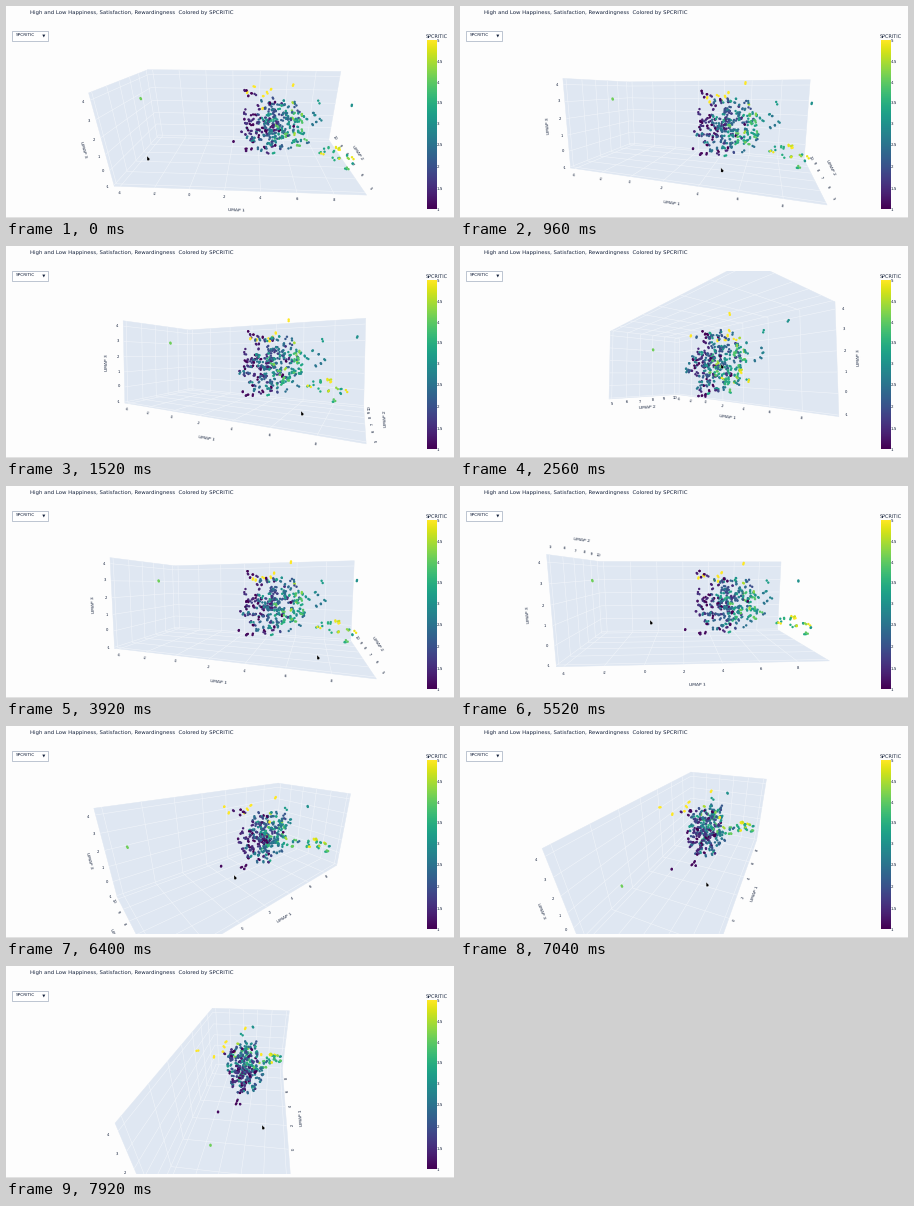
These frames come from a looping animation (448 px wide and 212 px high, 8 s). A matplotlib script:

```python
import numpy as np
import matplotlib as mpl
import matplotlib.pyplot as plt
from matplotlib.animation import FuncAnimation
from matplotlib.collections import LineCollection, PolyCollection
from matplotlib.patches import Polygon, Rectangle

mpl.rcParams["font.family"] = "DejaVu Sans"
mpl.rcParams["text.hinting"] = "none"

W, H, DPI = 448, 212, 100
FRAMES, STEP = 100, 80
PAGE, INK, WALL, GRID = "#fdfdfd", "#16233d", "#dfe7f2", "#f1f5fa"

# Scene viewport, focal length and camera distance (box half-length = 1)
VIEW = (58, 25, 352, 183)
CX, CY, FOCAL, DIST = 234, 116.5, 221, 2.02
HALF = np.array([1, 0.46, 0.39])

# Tick positions and labels along each axis
TICK_POS = [-0.95 + 0.284 * np.arange(7),
            0.42 - 0.17 * np.arange(6),
            0.34 - 0.144 * np.arange(6)]
TICK_LABELS = [range(-4, 9, 2), range(10, 4, -1), range(4, -2, -1)]

# Camera drag: time, azimuth, elevation, cursor x, cursor y
KEYS = np.array([
    (0, 3, 23, 142, 152),
    (1520, 28.5, 2.3, 296, 167),
    (2560, 53, -3, 262, 120),
    (3920, 18, 5, 312, 171),
    (5520, -3, 7.7, 191, 136),
    (6400, -39.5, 23, 229, 151),
    (7600, -82, 33, 256, 161),
    (7920, -83, 33.3, 257, 161),
], float)
T, V = KEYS[:, 0], KEYS[:, 1:]


def key_slopes(t, v):
    """Monotone cubic slopes, one column per channel."""
    d = np.diff(v, axis=0) / np.diff(t)[:, None]
    prod = d[:-1] * d[1:]
    total = np.where(prod > 0, d[:-1] + d[1:], 1)
    inner = np.where(prod > 0, 2 * prod / total, 0)
    return np.vstack([d[:1], inner, d[-1:]])


SLOPES = key_slopes(T, V)


def pose(t):
    k = min(np.searchsorted(T, t, side="right") - 1, len(T) - 2)
    h = T[k + 1] - T[k]
    u = (t - T[k]) / h
    return ((1 + 2 * u) * (1 - u) ** 2 * V[k] + u * (1 - u) ** 2 * h * SLOPES[k]
            + u * u * (3 - 2 * u) * V[k + 1] + u * u * (u - 1) * h * SLOPES[k + 1])


def project(p, az, el):
    """Box coordinates to pixels; returns (xy, depth)."""
    p = np.asarray(p, float)
    a, e = np.radians((az, el))
    x, y, z = p[..., 0], p[..., 1], p[..., 2]
    right = x * np.cos(a) + y * np.sin(a)
    ahead = -x * np.sin(a) + y * np.cos(a)
    depth = DIST + ahead * np.cos(e) - z * np.sin(e)
    up = z * np.cos(e) + ahead * np.sin(e)
    xy = np.stack([CX + FOCAL * right / depth, CY - FOCAL * up / depth], -1)
    return xy, depth


def make_points():
    """Main cloud, an arm, small groups and outliers, mostly as close pairs."""
    rng = np.random.default_rng(12)

    def group(n, centre, spread, value, noise=0.0):
        p = centre + rng.normal(0, 1, (n, 3)) * spread
        return p, value + rng.normal(0, noise, n)

    n = 215
    ball = rng.normal(0, 1, (n, 3))
    ball *= (rng.random(n) ** 0.45 / np.linalg.norm(ball, axis=1))[:, None]
    cloud = ball * (0.3, 0.2, 0.28) + (0.3, -0.02, -0.01)
    cloud_value = 0.31 + 0.25 * ball[:, 0] + rng.normal(0, 0.17, n)

    along = rng.random((20, 1))
    arm = (0.42, -0.15, -0.06) + along * (0.5, -0.24, -0.1) + rng.normal(0, 0.03, (20, 3))

    parts = [
        (cloud, cloud_value),
        (arm, rng.normal(0.68, 0.16, 20)),
        group(8, (0.65, 0.06, 0.06), 0.05, 0.5, 0.1),
        group(5, (0.05, 0.08, 0.25), 0.035, 0.04, 0.04),
        group(3, (0.07, 0.04, -0.31), 0.02, 0.03, 0.02),
        group(6, (0.24, 0, 0.22), (0.12, 0.15, 0.06), 1),
        group(4, (0.84, -0.34, -0.14), 0.04, 0.95, 0.05),
        group(1, (-0.08, 0.205, -0.31), 0, 0.02),
        group(1, (0.12, 0.4, 0.24), 0, 1),
        group(1, (-0.915, 0.043, 0.204), 0, 0.78),
        group(1, (0.945, -0.04, 0.2), 0, 0.5),
    ]
    base = np.vstack([p for p, _ in parts])
    value = np.concatenate([v for _, v in parts])
    shift = rng.normal(0, 0.009, base.shape)
    colors = plt.cm.viridis(np.clip(value, 0, 1))
    return np.vstack([base, base + shift]), np.vstack([colors, colors])


POINTS, COLORS = make_points()


def face(axis, sign):
    """Corners and grid lines of one side of the box."""
    i, j = [k for k in range(3) if k != axis]
    quad = np.full((4, 3), sign, float)
    quad[:, i], quad[:, j] = (-1, 1, 1, -1), (-1, -1, 1, 1)
    lines = []
    for m, n in [(i, j), (j, i)]:
        for pos in TICK_POS[m]:
            line = np.tile(HALF * sign, (2, 1))
            line[:, m] = pos
            line[:, n] = -HALF[n], HALF[n]
            lines.append(line)
    return quad * HALF, lines


def axis_edges(az, el):
    """Edge of the box that carries each axis: signs, 0 along the axis."""
    uprights = [(sx, sy, 0) for sx in (-1, 1) for sy in (-1, 1)]
    xs = project(HALF * uprights, az, el)[0][:, 0]
    if el < 0:
        return (0, 1, -1), (-1, 0, -1), uprights[np.argmax(xs)]
    y_edge = (1, 0, -1) if az > 0 else (-1, 0, 1 if az > -12 else -1)
    return (0, -1, -1), y_edge, uprights[np.argmin(xs)]


fig = plt.figure(figsize=(W / DPI, H / DPI), dpi=DPI, facecolor=PAGE)
ax = fig.add_axes([0, 0, 1, 1])
ax.axis("off")


def label(x, y, s, px, **kw):
    return ax.text(x, y, s, fontsize=px * 72 / DPI, va="center", color=INK, **kw)


def scene_label(s, px):
    return label(0, 0, s, px, ha="center", rotation_mode="anchor", zorder=3)


# Fixed page parts
ramp = np.linspace(1, 0, 256)[:, None]
ax.imshow(ramp, cmap="viridis", extent=(420.5, 430, 203.5, 35), aspect="auto")
ax.set_xlim(0, W)
ax.set_ylim(H, 0)
label(24, 7, "High and Low Happiness, Satisfaction, Rewardingness  Colored by SPCRITIC", 5.42)
label(420, 30.3, "SPCRITIC", 4.85)
for k in range(9):
    label(431, 35 + 21.06 * k, f"{5 - k / 2:g}", 4)
ax.add_patch(Rectangle((5.5, 25), 36, 10, fc="white", ec="#a3aebf", lw=0.5))
label(9.5, 30, "SPCRITIC", 4.2)
ax.add_patch(Polygon([(36.3, 28.6), (39.3, 28.6), (37.8, 31.4)], fc=INK, lw=0))
ax.plot([0, W], [211, 211], color="#dddddd", lw=0.6)

# Moving parts
viewport = ax.add_patch(Rectangle(VIEW[:2], *VIEW[2:], fc="none", ec="none"))
walls = ax.add_collection(PolyCollection([], facecolors=WALL, edgecolors=WALL, linewidths=0.3))
grid = ax.add_collection(LineCollection([], colors=GRID, linewidths=0.4))
dots = ax.scatter(POINTS[:, 0], POINTS[:, 1], s=3, c=COLORS, linewidths=0, zorder=4)
tick_texts = [[scene_label(str(v), 3.8) for v in values] for values in TICK_LABELS]
names = [scene_label(f"UMAP {k + 1}", 4.4) for k in range(3)]
for art in [walls, grid, dots, *names, *sum(tick_texts, [])]:
    art.set_clip_on(True)
    art.set_clip_path(viewport)
ARROW = np.array([(0, 0), (0, 4.4), (1.9, 4.6), (3, 3)])
cursor = ax.add_patch(Polygon(ARROW, fc="black", ec="white", lw=0.2, zorder=6))


def place_axis(k, signs, az, el):
    base = HALF * signs
    ends = np.tile(base, (2, 1))
    ends[:, k] = -HALF[k], HALF[k]
    (pa, pb), _ = project(ends, az, el)
    mid, depth = project(base, az, el)
    d = (pb - pa) / max(np.hypot(*(pb - pa)), 1e-6)
    out = np.array([-d[1], d[0]])
    out *= 1 if out @ (mid - (CX, CY)) > 0 else -1
    angle = (80 - np.degrees(np.arctan2(d[1], d[0]))) % 180 - 80
    names[k].set_position(mid + out * 34 / depth)
    names[k].set_rotation(angle)
    spots = np.tile(base, (len(TICK_POS[k]), 1))
    spots[:, k] = TICK_POS[k]
    for text, xy, depth in zip(tick_texts[k], *project(spots, az, el)):
        text.set_position(xy + out * 12 / depth)
        text.set_rotation(0 if k == 2 else angle)


def update(i):
    az, el, mx, my = pose(i * STEP)
    sides = [(0, -1 if az > -12 else 1), (1, 1), (2, -1 if el >= 0 else 1)]
    faces = [face(*s) for s in sides]
    walls.set_verts([project(quad, az, el)[0] for quad, _ in faces])
    grid.set_segments([project(line, az, el)[0] for _, lines in faces for line in lines])
    xy, depth = project(POINTS, az, el)
    order = np.argsort(-depth)
    dots.set_offsets(xy[order])
    dots.set_facecolors(COLORS[order])
    for k, signs in enumerate(axis_edges(az, el)):
        place_axis(k, signs, az, el)
    cursor.set_xy(ARROW + (mx - 1, my - 2))
    return []


anim = FuncAnimation(fig, update, frames=FRAMES, interval=STEP,
                     init_func=lambda: update(0), repeat=True, repeat_delay=0, blit=False)
plt.show()
```
